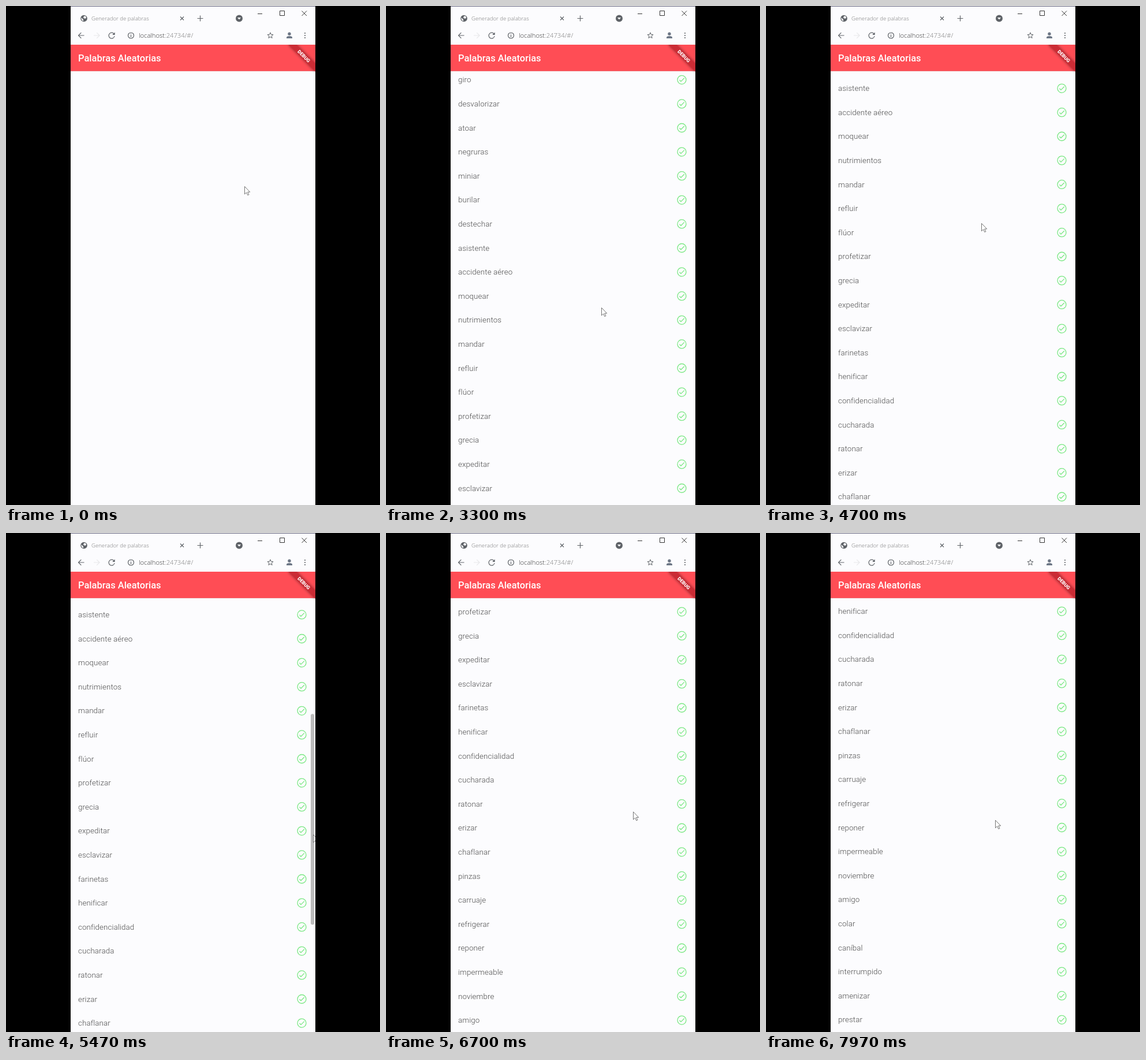
An HTML page for the animation above (8000 ms loop, 648 by 864 pixels).

```html
<!DOCTYPE html>
<html lang="es">
<head>
<meta charset="utf-8">
<title>Generador de palabras</title>
<style>
  html, body { margin: 0; width: 100%; height: 100%; overflow: hidden; background: #000; }
  svg { display: block; width: 648px; height: 864px; }
  .ui { font-family: "Open Sans", sans-serif; font-weight: 300; }
  .app { font-family: Roboto, sans-serif; }
  .line { fill: none; stroke: #5f6368; stroke-width: 1.2; }
  .window { fill: none; stroke: #333; }
  .word { font-size: 13.3px; font-weight: 300; letter-spacing: .12px; fill: #4c4c4c; }
  .tick { fill: none; stroke: #7be884; stroke-width: 1.3; }
</style>
</head>
<body>
<svg viewBox="0 0 648 864">
  <defs>
    <clipPath id="windowClip"><rect x="112" width="424" height="864"/></clipPath>
    <clipPath id="pageClip"><rect x="112" y="67" width="424" height="797"/></clipPath>
    <g id="tick" class="tick">
      <circle r="7.5"/>
      <path d="M-4 .2L-1.5 2.8L4.3-3"/>
    </g>
  </defs>
  <g clip-path="url(#windowClip)">
    <rect x="112" width="424" height="864" fill="#fcfcfe"/>
    <g class="app" id="list"></g>
    <rect id="thumb" x="528" width="6" height="365" rx="3" fill="#bcbcbc"/>

    <!-- browser chrome -->
    <rect x="112" width="424" height="67" fill="#fcfcfe"/>
    <rect x="112" width="424" height="1" fill="#6b6b85"/>
    <circle cx="135" cy="21.5" r="5.8" fill="#5f6368"/>
    <path d="M130.500 20l3.500 3.500v2.500q-4-1-3.500-6zM135 17.500h3l1 3-2 1.500-3-1.500z" fill="#fcfcfe"/>
    <g class="ui">
      <text x="148" y="25" font-size="9.6" fill="#777">Generador de palabras</text>
      <text x="230" y="55" font-size="11.2" fill="#333">localhost<tspan fill="#777">:24734/#/</tspan></text>
    </g>
    <g class="line">
      <path d="M302 18.500l6 6m0-6l-6 6M331.500 21.500h10m-5-5v10"/>
      <path d="M135.500 51h-10m4.800-4.800L125.500 51l4.800 4.800"/>
      <path d="M152 51h10m-4.800-4.800L162 51l-4.800 4.800" stroke="#e8e8ea"/>
      <path d="M187.300 48.500A5 5 0 1 0 188 52"/>
      <circle cx="216.5" cy="51" r="5"/>
      <path d="M216.500 50v4m0-6.500v1.300"/>
      <path id="star" stroke-width="1"/>
    </g>
    <g fill="#5f6368">
      <path d="M188.600 45.500v4.500h-4.500z"/>
      <circle cx="404" cy="21.5" r="6"/>
      <path d="M401 20h6l-3 3.600z" fill="#fff"/>
      <g fill="#6c7685">
        <circle cx="491" cy="48.3" r="2.7"/>
        <path d="M486 56v-1.500q0-2.500 5-2.500t5 2.500V56z"/>
      </g>
      <circle cx="518" cy="47" r="1.1"/>
      <circle cx="518" cy="51" r="1.1"/>
      <circle cx="518" cy="55" r="1.1"/>
    </g>
    <path class="window" d="M436 13.500h8M474.500 8.500h8v8h-8zM512.500 8.500l8.500 8.500m0-8.500l-8.500 8.500"/>

    <!-- app bar -->
    <rect x="112" y="67" width="424" height="46" fill="#ff4d55"/>
    <rect x="112" y="112" width="424" height="1" fill="#ee6a72"/>
    <text class="app" x="125" y="96.3" font-size="16.45" font-weight="500" fill="#fff">Palabras Aleatorias</text>
    <g clip-path="url(#pageClip)">
      <g transform="translate(536 67) rotate(45)">
        <rect x="-33" y="23" width="66" height="10" fill="#cb2c35" style="filter:drop-shadow(0 0 2.5px #0007)"/>
        <text class="app" y="31" font-size="8.4" font-weight="900" fill="#fff" text-anchor="middle">DEBUG</text>
      </g>
    </g>

    <path id="cursor" d="M.5.5v13.300l3.100-2.900 2.200 4.700 2.100-1-2.200-4.500h4z" fill="#fff" stroke="#666" stroke-width=".9"/>
  </g>
</svg>
<script>
const LOOP = 8000, ROW = 41.6, FIRST_ROW = 133;
const DRAG_MS = 440, STROKE_MS = 700, STROKE_HEIGHT = 150;

const words = `receptor,decisión,armonizar,giro,desvalorizar,atoar,negruras,miniar,burilar,destechar,
asistente,accidente aéreo,moquear,nutrimientos,mandar,refluir,flúor,profetizar,grecia,expeditar,
esclavizar,farinetas,henificar,confidencialidad,cucharada,ratonar,erizar,chaflanar,pinzas,carruaje,
refrigerar,reponer,impermeable,noviembre,amigo,colar,caníbal,interrumpido,amenizar,prestar`
  .split(',').map(word => word.trim());

// Each drag starts at a time and scrolls the list by a distance.
const drags = [
  { start: 2600, distance: 130 }, { start: 3350, distance: 128.6 }, { start: 4300, distance: 149 },
  { start: 5930, distance: 175 }, { start: 6500, distance: 172 }, { start: 7440, distance: 158 },
];

// Resting places of the hand; the drag strokes lift the cursor from there.
const moves = [
  { start: 0, end: 2000, x: 373, y: 308 },
  { start: 2150, end: 2550, x: 373, y: 522 },
  { start: 4900, end: 5300, x: 532, y: 522 },
  { start: 5700, end: 5930, x: 428, y: 600 },
  { start: 7300, end: 7950, x: 397, y: 600 },
];

const $ = id => document.getElementById(id);
const progress = (t, start, length) => Math.min(1, Math.max(0, (t - start) / length));
const easeInOut = p => p * p * (3 - 2 * p);
const easeOut = p => 1 - (1 - p) ** 2;

const scrollAt = t => drags.reduce((sum, { start, distance }) =>
  sum + distance * easeOut(progress(t, start, DRAG_MS)), 0);

function cursorAt(t) {
  let x = 413, y = 312;
  for (const move of moves) {
    const p = easeInOut(progress(t, move.start, move.end - move.start));
    x += (move.x - x) * p;
    y += (move.y - y) * p;
  }
  for (const { start } of drags)
    y -= STROKE_HEIGHT * Math.sin(Math.PI * progress(t, start, STROKE_MS));
  return [x, y];
}

$('star').setAttribute('d', 'M' + Array.from({ length: 10 }, (_, i) => {
  const r = i % 2 ? 2.3 : 5.3, angle = i * Math.PI / 5;
  return `${458 + r * Math.sin(angle)} ${51.2 - r * Math.cos(angle)}`;
}).join('L') + 'z');

$('list').innerHTML = words.map((word, i) => {
  const y = FIRST_ROW + i * ROW;
  return `<g><text class="word" x="125" y="${y + 4.6}">${word}</text>
    <use href="#tick" x="512.5" y="${y}"/></g>`;
}).join('');
const rows = [...$('list').children];

function draw() {
  const t = performance.now() % LOOP;
  const scroll = scrollAt(t);
  rows.forEach((row, i) => row.setAttribute('visibility', t >= 150 + 118 * i ? 'visible' : 'hidden'));
  $('list').setAttribute('transform', `translate(0 ${-scroll})`);
  $('cursor').setAttribute('transform', `translate(${cursorAt(t)})`);
  $('thumb').setAttribute('y', 113 + scroll * 0.491);
  $('thumb').setAttribute('opacity', progress(t, 5150, 200) * (1 - progress(t, 5950, 300)));
  requestAnimationFrame(draw);
}
draw();
</script>
</body>
</html>
```
